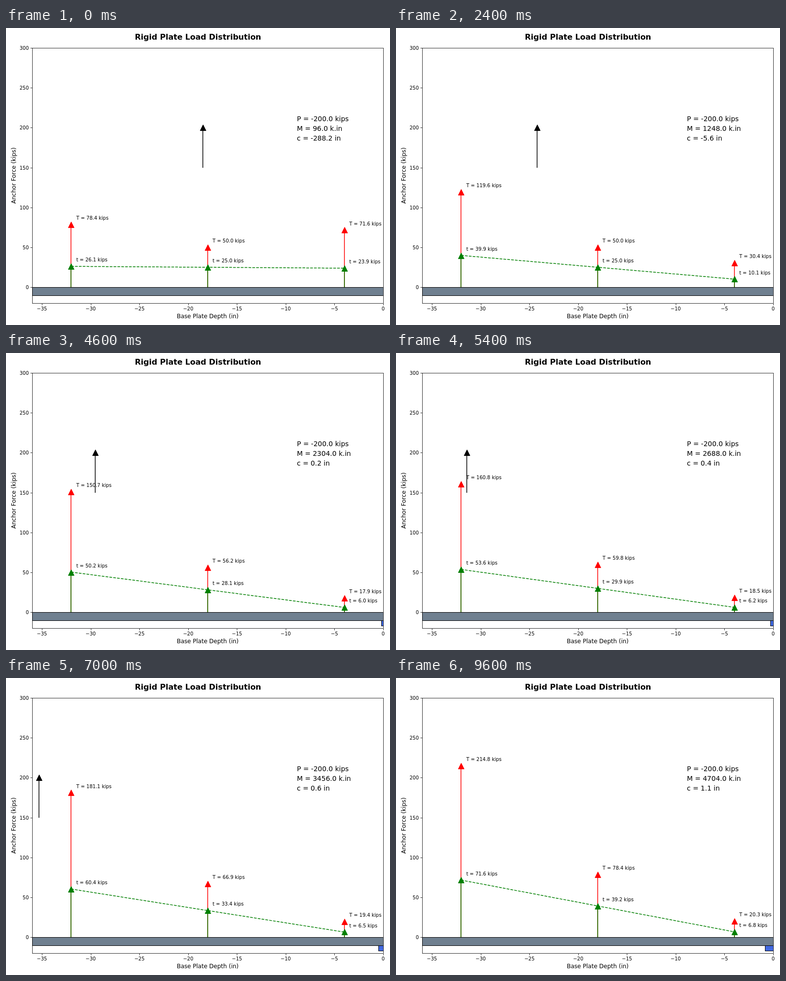
Recreate the animation shown at these times as an HTML page with a canvas. Size 792 by 612 pixels, loop 9800 ms.

```html
<!DOCTYPE html>
<html lang="en">
<head>
<meta charset="utf-8">
<title>Rigid Plate Load Distribution</title>
<style>
  html, body { margin: 0; width: 100%; height: 100%; overflow: hidden; background: #fff; }
  canvas { display: block; }
</style>
</head>
<body>
<canvas id="chart" width="792" height="612"></canvas>
<script>
const ctx = document.getElementById('chart').getContext('2d');
const LEFT = 54, RIGHT = 778, TOP = 41, BOTTOM = 567;
const STEP = 200, STEPS = 49;
const LOAD = 200, HALF = 18, BEARING = 106.08;
const ANCHORS = [[32, 3], [18, 2], [4, 3]]; // depth, bolts in the row

const px = x => RIGHT + x * (RIGHT - LEFT) / 36;
const py = y => BOTTOM - (y + 20) * (BOTTOM - TOP) / 320;
const snap = v => Math.round(v) + 0.5;

// Neutral axis c and strain slope for a moment
function solve(moment) {
  let c = HALF - LOAD * 147 / moment;
  if (c <= 0) return { c, slope: moment / 1176 };
  let lo = 0, hi = 3;
  for (let i = 0; i < 40; i++) {
    c = (lo + hi) / 2;
    const force = BEARING * c;
    const resisted = 147 * (LOAD + force) / (HALF - c) + force * (HALF - c / 2);
    if (resisted < moment) lo = c; else hi = c;
  }
  return { c, slope: (LOAD + BEARING * c) / (8 * (HALF - c)) };
}

function text(str, x, y, size = 10, align = 'left', weight = '') {
  ctx.font = `${weight} ${size}px "DejaVu Sans", sans-serif`;
  ctx.textAlign = align;
  ctx.fillStyle = '#000';
  ctx.fillText(str, x, y);
}

function line(x1, y1, x2, y2, color, width) {
  ctx.strokeStyle = color;
  ctx.lineWidth = width;
  ctx.beginPath();
  ctx.moveTo(x1, y1);
  ctx.lineTo(x2, y2);
  ctx.stroke();
}

function box(x1, y1, x2, y2, fill) {
  const rect = [snap(x1), snap(y1), snap(x2) - snap(x1), snap(y2) - snap(y1)];
  ctx.fillStyle = fill;
  ctx.fillRect(...rect);
  ctx.strokeStyle = '#000';
  ctx.lineWidth = 1;
  ctx.strokeRect(...rect);
}

function arrow(x, from, to, color) {
  const cx = Math.round(px(x)), cy = Math.round(py(to));
  line(cx, Math.round(py(from)), cx, cy, color, 1.5);
  ctx.fillStyle = color;
  ctx.lineWidth = 1;
  ctx.beginPath();
  ctx.moveTo(cx + 0.5, cy - 5.5);
  ctx.lineTo(cx - 5.5, cy + 6.5);
  ctx.lineTo(cx + 6.5, cy + 6.5);
  ctx.closePath();
  ctx.fill();
  ctx.stroke();
}

function drawAxes() {
  ctx.strokeStyle = '#000';
  ctx.lineWidth = 0.8;
  ctx.strokeRect(LEFT + 0.5, TOP + 0.5, RIGHT - LEFT, BOTTOM - TOP);
  for (let x = -35; x <= 0; x += 5) {
    line(snap(px(x)), BOTTOM + 1, snap(px(x)), BOTTOM + 4.5, '#000', 0.8);
    text(String(x).replace('-', '\u2212'), px(x), 582, 10, 'center');
  }
  for (let y = 0; y <= 300; y += 50) {
    line(LEFT - 3.5, snap(py(y)), LEFT, snap(py(y)), '#000', 0.8);
    text(y, 47, Math.round(py(y)) + 4, 10, 'right');
  }
  text('Rigid Plate Load Distribution', 396, 24, 16, 'center', 'bold');
  text('Base Plate Depth (in)', 416, 598, 12, 'center');
  ctx.save();
  ctx.translate(20, 304);
  ctx.rotate(-Math.PI / 2);
  text('Anchor Force (kips)', 0, 0, 12, 'center');
  ctx.restore();
}

function draw(moment) {
  const { c, slope } = solve(moment);
  const rows = ANCHORS.map(([depth, bolts]) => {
    const t = slope * (depth - c);
    return { x: -depth, t, total: t * bolts };
  });

  ctx.fillStyle = '#fff';
  ctx.fillRect(0, 0, 792, 612);

  ctx.save();
  ctx.beginPath();
  ctx.rect(LEFT, TOP, RIGHT - LEFT, BOTTOM - TOP);
  ctx.clip();
  box(LEFT, py(0), RIGHT, py(-10), '#708090');
  if (c > 0) box(px(-0.8 * c), py(-10), RIGHT, py(-17), '#4169e1');
  arrow(-HALF - moment / LOAD, 150, 200, '#000');
  for (const r of rows) {
    arrow(r.x, 0, r.total, '#f00');
    arrow(r.x, 0, r.t, '#008000');
  }
  ctx.setLineDash([5.55, 2.4]);
  line(px(-32), py(rows[0].t), px(-4), py(rows[2].t), '#008000', 1.5);
  ctx.restore();

  drawAxes();
  const label = (name, x, v) =>
    text(`${name} = ${v.toFixed(1)} kips`, Math.round(px(x + 0.5)), Math.round(py(v + 6)));
  for (const r of rows) {
    label('T', r.x, r.total);
    label('t', r.x, r.t);
  }
  text(`P = -${LOAD.toFixed(1)} kips`, 600, 192, 14);
  text(`M = ${moment.toFixed(1)} k.in`, 600, 212, 14);
  text(`c = ${(c + 1e-9).toFixed(1)} in`, 600, 232, 14);
}

function tick() {
  const step = Math.floor(performance.now() / STEP) % STEPS;
  draw(96 * (step + 1));
  requestAnimationFrame(tick);
}
tick();
</script>
</body>
</html>
```
